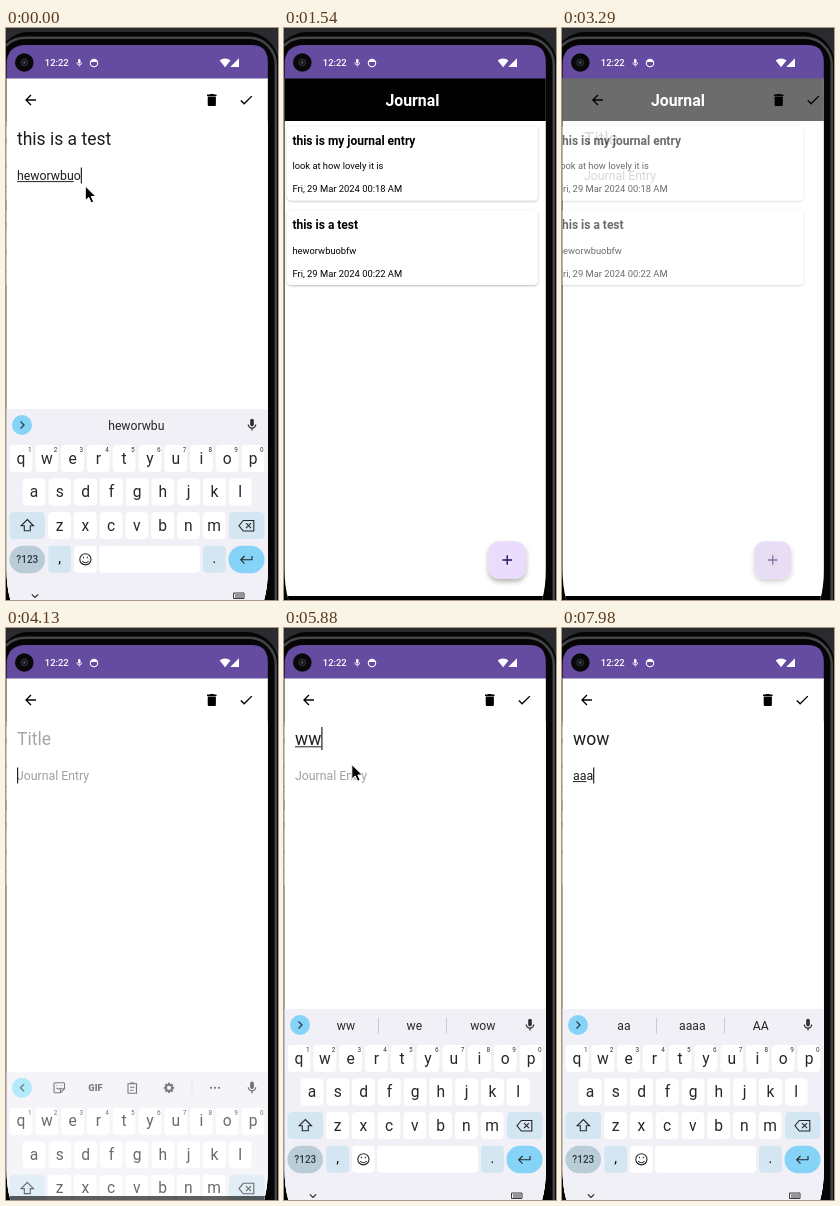
These frames come from a looping animation (272 px wide and 572 px high, 8 s). An HTML page:

```html
<!DOCTYPE html>
<html lang="en">
<head>
<meta charset="utf-8">
<title>Journal app</title>
<style>
  html, body { margin: 0; width: 100%; height: 100%; overflow: hidden; background: #26282c; }
  svg { display: block; width: 100%; height: 100%; }
  text { font-family: Roboto, sans-serif; white-space: pre; }
  .mid { text-anchor: middle; }
  .line { fill: none; stroke: #3c4043; stroke-width: 1.1; }
</style>
</head>
<body>
<svg id="stage" viewBox="0 0 272 572"></svg>
<script>
const LOOP = 8000, TICK = 70, SLIDE = 26, SLIDE_MS = 450;
const CLOSE_AT = 1370, OPEN_AT = 3205, KEYS_AT = 4040;

const PATHS = {
  back: 'M20 11H7.83l5.59-5.59L12 4l-8 8 8 8 1.41-1.41L7.83 13H20z',
  bin: 'M6 19c0 1.1.9 2 2 2h8c1.1 0 2-.9 2-2V7H6zM19 4h-3.5l-1-1h-5l-1 1H5v2h14z',
  check: 'M9 16.17L4.83 12l-1.42 1.41L9 19 21 7l-1.41-1.41z',
  mic: 'M12 14c1.66 0 3-1.34 3-3V5c0-1.66-1.34-3-3-3S9 3.34 9 5v6c0 1.66 1.34 3 3 3zm5-3c0 2.76-2.24 5-5 5s-5-2.24-5-5H5c0 3.53 2.61 6.43 6 6.92V21h2v-3.08c3.39-.49 6-3.39 6-6.92z'
};

// Each step changes only the named properties; the rest carries over.
const STEPS = [
  [0, { title: 'this is a test', body: 'heworwbuo', focus: 'body', caret: 1, mark: 8,
        words: ['', 'heworwbu', ''], tools: 0, pointer: [79.3, 158] }],
  [70, { body: 'heworwbuob', mark: 9, words: ['', 'heworwbuo', ''], pointer: null }],
  [140, { body: 'heworwbuobfw', words: ['', 'heworwbuobf', ''] }],
  [350, { mark: 12, words: ['', 'heworwbuobfw', ''] }],
  [910, { caret: 0 }],
  [1400, { caret: 1, mark: 0 }],
  [1960, { title: '', body: '', caret: 0, tools: 1 }],
  [3920, { caret: 1 }],
  [4550, { caret: 0 }],
  [5040, { caret: 1 }],
  [5110, { focus: 'title' }],
  [5180, { title: 'w' }],
  [5320, { mark: 1, tools: 0, words: ['w', 'we', 'was'] }],
  [5530, { title: 'ww' }],
  [5740, { mark: 2, words: ['ww', 'we', 'wow'] }],
  [5880, { pointer: [67.8, 136.5] }],
  [6300, { title: 'w', mark: 1, words: ['w', 'we', 'was'], pointer: null }],
  [6510, { title: 'wo' }],
  [6720, { title: 'wow', mark: 2, words: ['wo', 'wow', 'work'] }],
  [6930, { mark: 3, words: ['wow', 'wows', 'wowing'] }],
  [7140, { pointer: [67.8, 136.5] }],
  [7210, { pointer: [67.8, 137.2] }],
  [7420, { focus: 'body', mark: 0, tools: 1 }],
  [7490, { body: 'a', pointer: null }],
  [7700, { mark: 1, tools: 0, words: ['a', 'and', 'at'] }],
  [7840, { body: 'aa' }],
  [7980, { body: 'aaa', mark: 2, words: ['aa', 'aaaa', 'AA'] }]
];

const FIELDS = {
  title: { size: 17.5, base: 117, top: 99, bottom: 122, hint: 'Title', hintColor: '#a6a6a6' },
  body: { size: 12.3, base: 151.8, top: 139.5, bottom: 155.5, hint: 'Journal Entry', hintColor: '#a0a0a0' }
};

const icon = (name, x, y, scale, fill = '#000') =>
  `<path d="${PATHS[name]}" fill="${fill}" transform="translate(${x} ${y}) scale(${scale}) translate(-12 -12)"/>`;
const label = (str, x, y, size, extra = '') =>
  `<text x="${x}" y="${y}" font-size="${size}" ${extra}>${str}</text>`;
const box = (x, y, w, h, r, fill, extra = '') =>
  `<rect x="${x}" y="${y}" width="${w}" height="${h}" rx="${r}" fill="${fill}" ${extra}/>`;

function card(y, title, body, date) {
  return box(5.5, y, 251, 74.5, 4.5, '#fff', 'filter="url(#soft)"') +
    label(title, 11, y + 18.7, 12, 'font-weight="700"') +
    label(body, 11, y + 43, 9.35) +
    label(date, 11, y + 66.4, 9.4);
}

function listPage() {
  return box(-40, 50, 350, 530, 0, '#fff') + box(-40, 50, 350, 43, 0, '#000') +
    label('Journal', 131, 78, 15.8, 'class="mid" font-weight="700" fill="#fff"') +
    card(98, 'this is my journal entry', 'look at how lovely it is', 'Fri, 29 Mar 2024 00:18 AM') +
    card(182.6, 'this is a test', 'heworwbuobfw', 'Fri, 29 Mar 2024 00:22 AM') +
    box(207, 513.3, 37.5, 37.5, 11, '#e9dcfc', 'filter="url(#lift)"') +
    box(207, 513.3, 37.5, 37.5, 11, '#21005d', 'id="press" opacity="0"') +
    '<path d="M221 532h9.6M225.8 527.2v9.6" stroke="#2d1068" stroke-width="1.4"/>';
}

function editorPage() {
  const field = id => `<text id="${id}" x="11" y="${FIELDS[id].base}" font-size="${FIELDS[id].size}"></text>`;
  return box(-40, 50, 350, 530, 0, '#fff') +
    icon('back', 24.5, 72, .68) + icon('bin', 205.8, 72, .68) + icon('check', 240.2, 72, .68) +
    field('title') + field('body') +
    box(11, 0, 0, 1, 0, '#222', 'id="mark"') + box(11, 0, 1.2, 10, 0, '#222', 'id="caret"');
}

function keyRow(chars, x, y, digits) {
  return [...chars].map((c, i) => {
    const cx = x + i * 25.78;
    return box(cx - 11.4, y - 13.5, 22.8, 27, 4, '#fff') +
      label(c, cx, y + 5, 15.6, 'class="mid" fill="#25272a"') +
      (digits ? label((i + 1) % 10, cx + 8.8, y - 6.3, 6.4, 'class="mid" fill="#333"') : '');
  }).join('');
}

function toolStrip() {
  const teeth = Array.from({ length: 8 }, (_, i) =>
    `<path d="M163 391.9v2" stroke-width="2.2" transform="rotate(${i * 45} 163 397)"/>`).join('');
  return `<g id="tools"><g class="line">
    <path d="M49 392h8.5q1 0 1 1v5l-4 4h-5.5q-1 0-1-1v-8q0-1 1-1zM58.5 398h-3q-1 0-1 1v3M50.5 397q2 2.5 4 0M51 394.5v.8M55 394.5v.8"/>
    <path d="M122 393h8.5v9.5h-8.5zM124 392.3h4.5M124 396.5h4.5M124 399.5h3.5"/>
    <circle cx="163" cy="397" r="3" stroke-width="1.8"/>${teeth}
    <path d="M186 390v14" stroke="#dcdce2" stroke-width="1"/></g>` +
    label('GIF', 89.5, 400.4, 9.4, 'class="mid" font-weight="800" fill="#3c4043"') +
    [205, 209, 213].map(x => `<circle cx="${x}" cy="397" r="1.1" fill="#3c4043"/>`).join('') +
    '<path d="M18 393.5l-3.5 3.5 3.5 3.5" fill="none" stroke="#23414f" stroke-width="1.3"/></g>';
}

function wordStrip() {
  return '<g id="words">' +
    [62, 130.3, 198.8].map(x => label('', x, 401.6, 12.2, 'class="mid word" fill="#25272a"')).join('') +
    '<path id="dividers" d="M94.5 389.5v16M162.5 389.5v16" stroke="#c9c9cf"/>' +
    '<path d="M14.5 393.5l3.5 3.5-3.5 3.5" fill="none" stroke="#23414f" stroke-width="1.3"/></g>';
}

function keyboard() {
  const tint = '#d4e6f1', sky = '#86d3f8';
  return box(0, 381, 263, 200, 0, '#f0f0f6') +
    `<circle id="toggle" cx="16" cy="397" r="10" fill="${sky}"/>` +
    toolStrip() + wordStrip() + icon('mic', 246, 397, .62, '#303236') +
    keyRow('qwertyuiop', 15, 430.5, true) + keyRow('asdfghjkl', 28, 464) + keyRow('zxcvbnm', 53.5, 497.5) +
    box(3.5, 484, 35.5, 27, 4.5, tint) + box(223, 484, 35.5, 27, 4.5, tint) +
    box(3.5, 517.8, 35.5, 27.5, 13.5, '#b9ccd7') + box(42.3, 517.8, 22.8, 27, 4, tint) +
    box(68, 517.8, 22.8, 27, 4, '#fff') + box(93, 517.8, 101, 27, 4, '#fff') +
    box(197, 517.8, 22.8, 27, 4, tint) + box(222.5, 517.8, 36, 27.5, 13.5, sky) +
    label('?123', 21.3, 535.2, 10, 'class="mid" font-weight="500" fill="#2b3b45"') +
    label(',', 53.7, 535, 14, 'class="mid"') + label('.', 208.4, 535, 14, 'class="mid"') +
    `<g class="line" style="stroke:#25272a">
      <path d="M21.3 491.5l6.2 6.3h-3.2v5h-6v-5h-3.2zM237.3 492.5h10.5v10.5h-10.5l-4.3-5.25zM240 495.2l5 5M245 495.2l-5 5"/>
      <circle cx="79.4" cy="531.3" r="5.6"/><path d="M76.2 533q3.2 3.5 6.4 0M77.5 528.7v1.5M81.3 528.7v1.5"/>
      <path d="M246 528v3.8h-11M238.5 528l-3.7 3.8 3.7 3.8"/>
      <path d="M25.8 566.3l3.2 3.2 3.2-3.2"/>
      <path d="M227.5 565h10.5v5.5h-10.5zM229 567h8M229 569h8" stroke-width=".9"/></g>`;
}

function statusBar() {
  return box(0, 16, 263, 34.5, 0, '#654ca1') +
    '<circle cx="18.3" cy="34.5" r="9.3" fill="#08080a"/><circle cx="18.3" cy="34.5" r="3.5" fill="#17181c" stroke="#2d2e34"/><circle cx="18.3" cy="34.5" r="1" fill="#666"/>' +
    label('12:22', 38.8, 38.3, 9.4, 'font-weight="500" fill="#fff"') + icon('mic', 73.3, 35, .4, '#fff') +
    `<circle cx="88" cy="35" r="3.7" fill="none" stroke="#fff" stroke-width="1.1"/><path d="M84.5 34a3.7 3.7 0 0 1 7 0z" fill="#fff"/>
     <path d="M213.7 32.6a8 8 0 0 1 10.8 0L219.1 39.2zM233 30.3v8.8h-8.8z" fill="#fff"/>`;
}

const stage = document.getElementById('stage');
stage.innerHTML = `
  <defs>
    <clipPath id="screen"><path d="M5 574Q.6 560 .6 542V36Q1 17 20 17H246Q261.8 17 261.8 34V542Q261.8 560 257.5 574z"/></clipPath>
    <clipPath id="pages"><rect y="50" width="272" height="522"/></clipPath>
    <filter id="soft" x="-5%" y="-10%" width="110%" height="125%"><feDropShadow dx="0" dy=".8" stdDeviation="1" flood-color="#101030" flood-opacity=".3"/></filter>
    <filter id="lift" x="-30%" y="-30%" width="160%" height="170%"><feDropShadow dx="0" dy="3" stdDeviation="2.5" flood-opacity=".3"/></filter>
  </defs>
  ${box(0, 0, 272, 572, 0, '#2a2b2f')}
  ${box(-9, 4, 281.5, 640, 32, '#050506')}
  ${box(-8, 9.7, 277.8, 640, 27, '#050506', 'stroke="#424446" stroke-width="2.6"')}
  <g clip-path="url(#screen)">
    <g clip-path="url(#pages)">
      <g id="list">${listPage()}</g>
      <g id="editor">${editorPage()}</g>
    </g>
    ${statusBar()}
    <g id="keyboard">${keyboard()}</g>
    ${box(0, 568, 272, 5, 0, '#000', 'id="nav"')}
  </g>
  <path id="pointer" d="M0 0V14.5L3.4 11.4 5.9 16.8 8.4 15.7 6 10.5H10.6Z" stroke="#fff" stroke-width="1"/>`;

const $ = id => document.getElementById(id);
const wordSlots = [...document.querySelectorAll('.word')];
const clamp = v => Math.min(1, Math.max(0, v));
const show = (el, on) => el.style.display = on ? '' : 'none';
const shift = (el, x, y = 0) => el.setAttribute('transform', `translate(${x} ${y})`);
const attrs = (el, set) => { for (const k in set) el.setAttribute(k, set[k]); };

const cubic = (u, a, b, c, d) =>
  a * (1 - u) ** 3 + 3 * b * u * (1 - u) ** 2 + 3 * c * u * u * (1 - u) + d * u ** 3;

// Two joined curves: a sharp start and a very long settle.
function slideEase(p) {
  p = clamp(p);
  const [xs, ys] = p < 1 / 6
    ? [[0, .05, .13333, 1 / 6], [0, 0, .06, .4]]
    : [[1 / 6, .20833, .25, 1], [.4, .82, 1, 1]];
  let lo = 0, hi = 1;
  for (let i = 0; i < 24; i++) {
    const u = (lo + hi) / 2;
    if (cubic(u, ...xs) < p) lo = u; else hi = u;
  }
  return cubic(hi, ...ys);
}

function stateAt(t) {
  return Object.assign({}, ...STEPS.filter(([at]) => at <= t).map(([, change]) => change));
}

function drawPages(t) {
  const closing = t < 3000, since = t - (closing ? CLOSE_AT : OPEN_AT);
  const eased = slideEase(since / SLIDE_MS);
  const away = closing ? eased : 1 - eased;
  const alpha = closing ? 1 - clamp((since - 35) / 83) : clamp((since - 50) / 83);
  shift($('editor'), SLIDE * away);
  shift($('list'), -SLIDE * (1 - away));
  $('editor').setAttribute('opacity', alpha);
  $('press').setAttribute('opacity', t >= 3080 && t < 3700 ? .1 * clamp((t - 3010) / 140) : 0);
}

function drawKeyboard(t, s) {
  const visible = t < 1400 || t >= 4060;
  const rise = t < 1400 ? 1 : clamp((t - KEYS_AT) / 230);
  const drop = 191 * (1 - rise) ** 2.24;
  show($('keyboard'), visible);
  shift($('keyboard'), 0, drop);
  $('keyboard').setAttribute('opacity', clamp(rise * 1.75));
  $('nav').setAttribute('opacity', visible ? clamp(drop / 100) : 1);
  show($('tools'), s.tools);
  show($('words'), !s.tools);
  show($('dividers'), s.words[0]);
  $('toggle').setAttribute('fill', s.tools ? '#8fe0fa' : '#86d3f8');
  wordSlots.forEach((el, i) => el.textContent = s.words[i]);
}

function drawFields(s) {
  for (const id in FIELDS) {
    $(id).textContent = s[id] || FIELDS[id].hint;
    $(id).setAttribute('fill', s[id] ? '#1c1c1e' : FIELDS[id].hintColor);
  }
  const field = FIELDS[s.focus], el = $(s.focus), count = s[s.focus].length;
  const widthOf = n => n ? el.getSubStringLength(0, n) : 0;
  attrs($('mark'), { y: field.base + 1.3, width: widthOf(Math.min(s.mark, count)) });
  attrs($('caret'), { x: 11 + widthOf(count), y: field.top, height: field.bottom - field.top });
  show($('caret'), s.caret);
}

function draw(time) {
  const t = Math.floor(time % LOOP / TICK) * TICK, s = stateAt(t);
  drawPages(t);
  drawKeyboard(t, s);
  drawFields(s);
  show($('pointer'), s.pointer);
  if (s.pointer) shift($('pointer'), ...s.pointer);
}

const start = performance.now();
function loop() {
  draw(performance.now() - start);
  requestAnimationFrame(loop);
}
loop();
</script>
</body>
</html>
```
